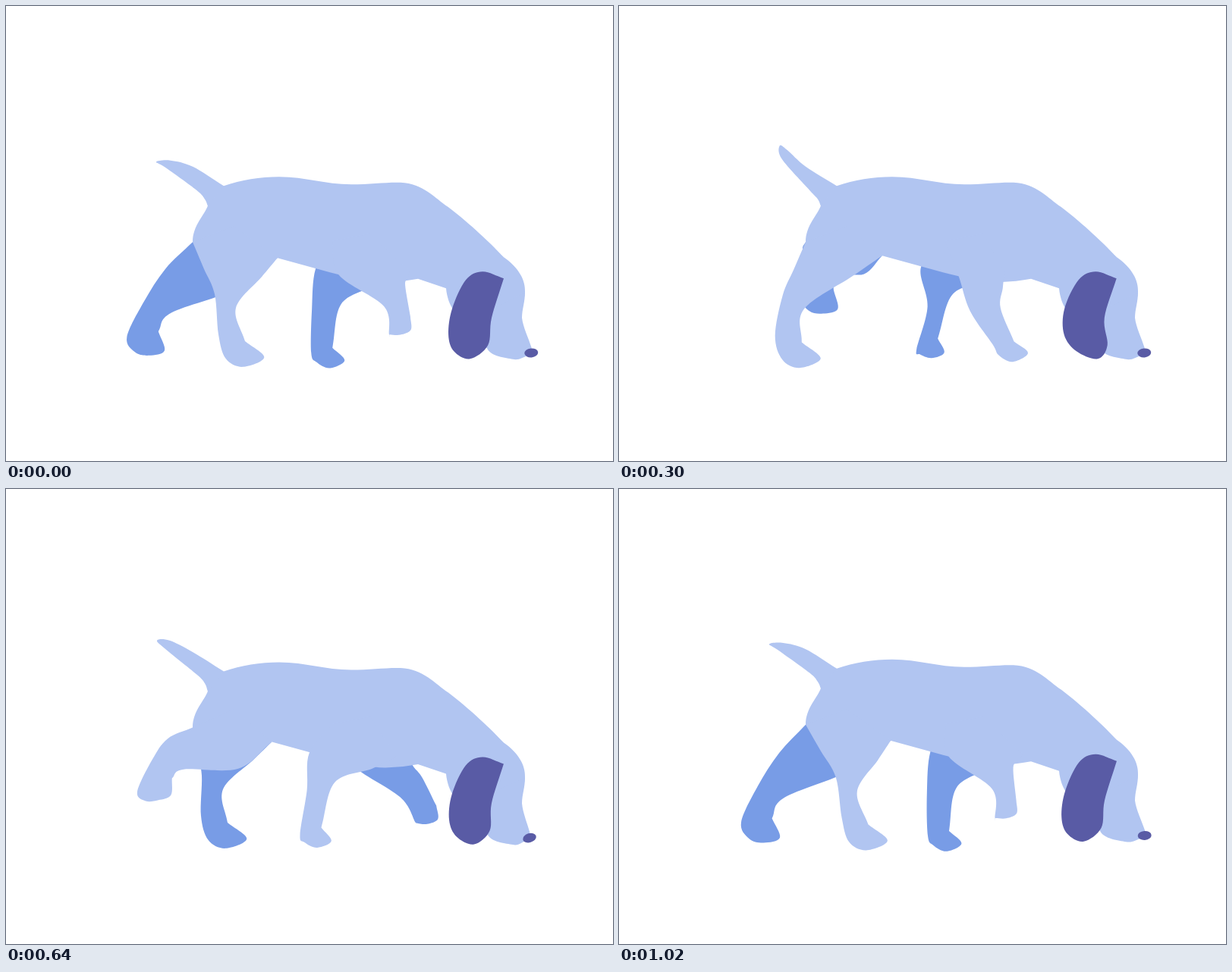
Write an HTML page with a canvas that moves like this. It is 800x600 px and loops after 1040 ms.

```html
<!DOCTYPE html>
<html lang="en">
<head>
<meta charset="utf-8">
<title>Sniffing dog</title>
<style>
html, body { margin: 0; width: 100%; height: 100%; overflow: hidden; background: #fff; }
canvas { display: block; }
</style>
</head>
<body>
<canvas id="stage" width="800" height="600"></canvas>
<script>
const ctx = document.getElementById('stage').getContext('2d');
const LOOP = 1040, STEP = 20, TURN = 2 * Math.PI;
const LIGHT = '#b1c5f1', MID = '#789ce6', DARK = '#595ba5';

// Ankle path of one stride: time, x, y, foot tilt in degrees
const hindStride = [
  [0, 315, 442, 0], [100, 285, 440, 0], [220, 265, 440, 0], [380, 216, 445, 5],
  [490, 194, 432, 30], [600, 208, 390, 53], [780, 267, 370, 42], [920, 336, 431, 0],
  [1000, 340, 442, 0]
];
const frontStride = [
  [0, 533, 410, 48], [100, 567, 415, 48], [240, 544, 437, 5], [400, 474, 448, 0],
  [500, 435, 451, 5], [620, 417, 447, 12], [800, 415, 441, 22], [920, 470, 420, 48]
];

const trunk = new Path2D(`M266 264C262 276 246 290 246 312L300 340L345 329.5L427 352
  C450 358 480 365 500 365Q525 364 543 360.5L580 373C581 385 585 395 590 402
  L634 452L680 412C680 400 684 392 684 378C685 362 675 345 656 332
  C640 315 612 288 583 266C565 254 550 235 520 233.5C500 233 480 236 455 236
  C420 236 395 226 360 226C335 226 310 230 287 238Z`);
const earShape = [[656, 360], [628, 351], [606, 362], [588, 400], [583, 434],
  [590, 456], [611, 466], [635, 448], [640, 412]];

const mix = (p, q, u) => p.map((v, i) => v + (q[i] - v) * u);
const add = ([x, y], dx, dy) => [x + dx, y + dy];
const polar = ([x, y], r, deg) =>
  [x + r * Math.cos(deg * TURN / 360), y + r * Math.sin(deg * TURN / 360)];

// Smooth cyclic interpolation along a stride
function ankleAt(stride, t) {
  const n = stride.length;
  const key = j => {
    const [time, ...rest] = stride[(j + n) % n];
    return [time + LOOP * Math.floor(j / n), ...rest];
  };
  const i = stride.findLastIndex(k => k[0] <= t);
  const [a, b, c, d] = [i - 1, i, i + 1, i + 2].map(key);
  const h = c[0] - b[0], u = (t - b[0]) / h;
  return [1, 2, 3].map(m => {
    const out = (c[m] - a[m]) / (c[0] - a[0]) * h;
    const into = (d[m] - b[m]) / (d[0] - b[0]) * h;
    return b[m] + (c[m] - b[m]) * u * u * (3 - 2 * u)
      + u * (1 - u) * ((1 - u) * out - u * into);
  });
}

// Fills a closed spline through the points; the listed indices are corners
function blob(points, corners, color) {
  const n = points.length;
  const handle = (i, dir) => {
    const p = points[i], q = points[(i + dir + n) % n];
    const r = points[(i - dir + n) % n];
    return p.map((v, c) => v + (corners.includes(i) ? (q[c] - v) / 3 : (q[c] - r[c]) / 6));
  };
  ctx.beginPath();
  ctx.moveTo(...points[0]);
  points.forEach((p, i) => {
    const j = (i + 1) % n;
    ctx.bezierCurveTo(...handle(i, 1), ...handle(j, -1), ...points[j]);
  });
  ctx.fillStyle = color;
  ctx.fill();
}

// Heel, sole and toe around the ankle
const foot = (ankle, size, toe, tilt) => [
  add(ankle, -size * (.75 + .005 * tilt), size * (.67 + .004 * tilt)),
  polar(ankle, size, 95 + tilt / 2),
  polar(ankle, toe * (1 - .006 * tilt), 40 + tilt)
];

const fillLeg = (points, color) => blob(points, [0, 1, 8, 11], color);

function hindLeg(t, shift, rump, groin, color) {
  const [x, y, tilt] = ankleAt(hindStride, t % LOOP);
  const ankle = [x + shift, y];
  const shin = add(ankle, (255 - x) * .2 + tilt * .15, -44 + tilt * .6);
  const hock = add(shin, -28 - tilt * .25, -18 + tilt * .1);
  const thigh = add(mix(rump, hock, .5), -tilt * .12, -tilt * .12);
  const calf = add(ankle, -35 - tilt * .2, -9 + tilt * .5);
  const belly = add(mix(shin, groin, .62), 0, tilt * .4);
  fillLeg([[300, 290], rump, thigh, hock, calf, ...foot(ankle, 34, 33, tilt),
    ankle, shin, belly, groin], color);
}

function frontLeg(t, bob, color) {
  const [x, y, tilt] = ankleAt(frontStride, t % LOOP);
  const ankle = [x, y];
  const shin = add(ankle, (462 - x) * .3 + tilt * .3, -50 + (x - 480) * .15);
  const elbow = add(shin, -40 + tilt * .25, 4 + tilt * .5);
  const calf = add(ankle, -28, 4 + tilt * .4);
  const backX = 403 + (x - 414) * .42 - tilt * .3;
  const back = [backX, 335 + (backX - 358) * .25 + bob];
  const chest = [508 + tilt * .5, 351 + bob];
  fillLeg([[480, 300], [430, 310], back, elbow, calf, ...foot(ankle, 27, 24, tilt),
    ankle, shin, add(mix(shin, chest, .6), 0, 2), chest], color);
}

function drawTail(lift, bob) {
  const tip = [198 + 14 * lift * lift, 206 - 22 * lift];
  blob([[300, 262 + bob], [287, 238 + bob], [246, 212.5 + bob],
    add(tip, 19 - 9 * lift, -2 + 8 * lift), tip, add(tip, 12 - 9 * lift, 7 + 11 * lift),
    [251, 243 + bob / 2], [262, 255 + bob / 2], [266, 264.5 + bob]], [0, 1, 8], LIGHT);
}

function drawHead(swing, bob) {
  const nx = 691.8 - .7 * bob, ny = 458 + .8 * bob;
  blob([[640, 400], [684, 378 + bob], [680, 412 + bob], [nx + .5, ny - 6.5],
    [nx - 5, ny + 4], [668, 466.5 + bob], [634, 452 + bob]], [0, 1, 3, 4], LIGHT);

  // the ear bends more towards its lower end
  blob(earShape.map(([x, y]) => {
    const w = (y - 351) / 115;
    return [x + swing * (24 * w ** 4 - 4 * w), y + bob];
  }), [0], DARK);

  ctx.beginPath();
  ctx.ellipse(nx, ny, 9, 6, (-8 - 3.5 * bob) * TURN / 360, 0, TURN);
  ctx.fill();
}

function draw(t) {
  // body, ear and tail sway twice per stride
  const bob = 2.8 * Math.sin(TURN * (t - 20) / (LOOP / 2));
  const swing = .5 + .5 * Math.cos(TURN * (t - 285) / (LOOP / 2));
  const groinX = 352 + 7 * Math.cos(TURN * (t + 100) / LOOP);
  const groin = [groinX, 333 + bob - (358 - groinX) * .27];
  const rump = [246, 312 + bob];

  ctx.clearRect(0, 0, 800, 600);
  hindLeg(t + 500, 7, rump, groin, MID);
  frontLeg(t + LOOP / 2, bob, MID);

  drawTail(swing, bob);
  ctx.save();
  ctx.translate(0, bob);
  ctx.fillStyle = LIGHT;
  ctx.fill(trunk);
  ctx.restore();

  hindLeg(t, 0, rump, groin, LIGHT);
  frontLeg(t, bob, LIGHT);
  drawHead(swing, bob);
}

function frame() {
  const t = performance.now() % LOOP;
  draw(Math.floor(t / STEP) * STEP);
  requestAnimationFrame(frame);
}
frame();
</script>
</body>
</html>
```
